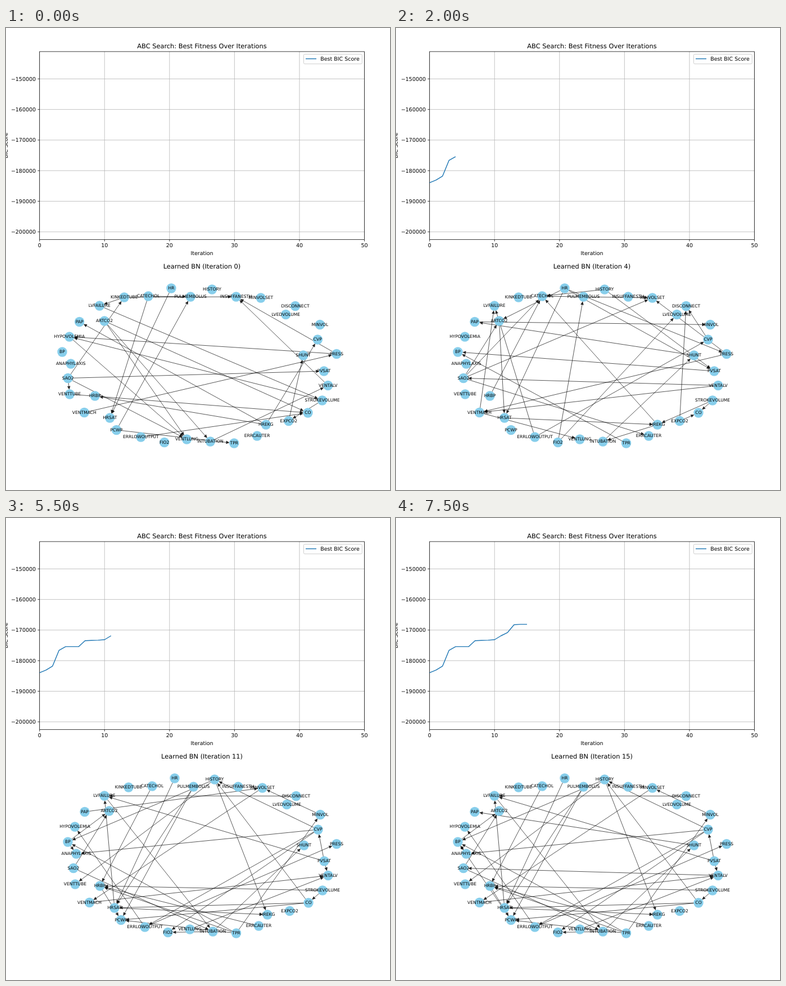
An HTML page that plays this animation: 683x820 px, repeating every 8 s.

```html
<!DOCTYPE html>
<html lang="en">
<head>
<meta charset="utf-8">
<title>Network search</title>
<style>
  html, body { margin: 0; width: 100%; height: 100%; overflow: hidden; background: #fff; }
  svg { display: block; width: 683px; height: 820px; }
  text { font: 9.48px "DejaVu Sans", sans-serif; fill: #000; text-anchor: middle; text-rendering: geometricPrecision; }
  text.title { font-size: 11.38px; }
  text.end { text-anchor: end; }
  text.start { text-anchor: start; }
  #labels text { font-size: 7.59px; }
  #nodes { fill: #87ceeb; }
  .grid { stroke: #b0b0b0; stroke-width: .76; }
  .tick { stroke: #000; stroke-width: .76; }
  .frame { fill: none; stroke: #000; stroke-width: .76; }
  .series { fill: none; stroke: #1f77b4; stroke-width: 1.42; stroke-linejoin: round; }
  #lines { fill: none; stroke: #000; stroke-opacity: .7; stroke-width: .95; }
  #heads { fill: #000; fill-opacity: .85; }
</style>
</head>
<body>
<svg viewBox="0 0 683 820">
  <g id="axes"></g>
  <polyline id="curve" class="series"/>
  <g id="legend"></g>
  <text id="heading" class="title" x="348.5" y="427"></text>
  <g id="lines"></g>
  <g id="heads"></g>
  <g id="nodes"></g>
  <g id="labels"></g>
</svg>
<script>
const STEP = 500, COUNT = 16;
const LEFT = 59.7, RIGHT = 637.5, TOP = 41.9, BOTTOM = 375.5;
const NODE_R = 8.69, GAP = 8.2, HEAD = 6.2, HALF = 2.8;

// Height of the curve at each iteration
const curveY = [274.6, 269.8, 262.8, 234.8, 228.4, 228.4, 228.4, 217.7,
  217.2, 216.9, 216, 209, 203.3, 189.5, 188.6, 188.6];

const places = `HR 300 462;HISTORY 371 464;PULMEMBOLUS 333.5 477;CATECHOL 260 476;KINKEDTUBE 218 478;
INSUFFANESTH 413 477;MINVOLSET 456 479;DISCONNECT 516 493.5;LVEDVOLUME 499.5 508.5;MINVOL 559 526.5;
CVP 555 553;PRESS 588 578.5;SHUNT 530 581;PVSAT 566 609;VENTALV 573 634.5;STROKEVOLUME 563 661;
CO 538 683;EXPCO2 504.5 697.5;HREKG 465 704;ERRCAUTER 449.5 724;TPR 409.5 737;INTUBATION 368 734;
VENTLUNG 327 730;FIO2 288 735.5;ERRLOWOUTPUT 247 726;PCWP 204.5 713.5;HRSAT 193 692;VENTMACH 148.5 682.5;
HRBP 167 653;VENTTUBE 123 650;SAO2 120 621.5;ANAPHYLAXIS 125 596;BP 110 575;HYPOVOLEMIA 122.5 548;
PAP 140 521.5;ARTCO2 183.5 520;LVFAILURE 175 493`;

const nodes = {};
for (const row of places.split(";")) {
  const [name, x, y] = row.trim().split(" ");
  nodes[name] = { x: +x, y: +y };
}

// "SOURCE>TARGET,TARGET SOURCE>TARGET" becomes a set of single links
const links = text => new Set(text.trim().split(/\s+/).flatMap(part => {
  const [from, to] = part.split(">");
  return to.split(",").map(t => from + ">" + t);
}));

const change = (base, add = "", drop = "") => {
  const out = new Set(base);
  if (drop) links(drop).forEach(l => out.delete(l));
  if (add) links(add).forEach(l => out.add(l));
  return out;
};

const first = links(`KINKEDTUBE>LVFAILURE,INSUFFANESTH CATECHOL>PULMEMBOLUS,HRSAT HR>HRSAT
  SAO2>KINKEDTUBE,PVSAT,VENTTUBE,VENTLUNG PCWP>PULMEMBOLUS,TPR LVFAILURE>STROKEVOLUME
  ARTCO2>VENTLUNG,INTUBATION,CO HYPOVOLEMIA>VENTLUNG HREKG>PAP,HRBP,CVP
  PRESS>HYPOVOLEMIA,INSUFFANESTH STROKEVOLUME>HYPOVOLEMIA,EXPCO2 VENTALV>INSUFFANESTH
  VENTTUBE>CO VENTMACH>PRESS ERRLOWOUTPUT>CO INTUBATION>VENTALV EXPCO2>SHUNT`);

const second = links(`HISTORY>CATECHOL,PVSAT HR>ARTCO2,PRESS,HRSAT,PVSAT CATECHOL>MINVOLSET
  PRESS>MINVOLSET,VENTMACH CVP>DISCONNECT EXPCO2>DISCONNECT,CO
  FIO2>PULMEMBOLUS,LVEDVOLUME ERRLOWOUTPUT>CVP,LVFAILURE HREKG>CATECHOL,INTUBATION
  SHUNT>PAP PAP>MINVOL PVSAT>BP TPR>BP VENTALV>SAO2,VENTMACH
  SAO2>CATECHOL,MINVOLSET,ARTCO2,ERRCAUTER HRBP>CATECHOL ARTCO2>HRSAT
  VENTMACH>LVFAILURE,VENTLUNG STROKEVOLUME>HREKG,CO HYPOVOLEMIA>ARTCO2`);

const third = links(`CATECHOL>HRBP HR>HRSAT PULMEMBOLUS>HRSAT,PCWP HISTORY>BP,VENTTUBE,HREKG
  CO>HISTORY,HRSAT,PCWP CVP>HISTORY,ANAPHYLAXIS,ERRLOWOUTPUT,FIO2 MINVOLSET>VENTMACH
  MINVOL>MINVOLSET DISCONNECT>LVFAILURE PVSAT>LVFAILURE,CVP,VENTALV PAP>MINVOLSET
  LVFAILURE>INTUBATION HRSAT>LVFAILURE,HREKG BP>ARTCO2,ANAPHYLAXIS SAO2>ARTCO2,INTUBATION
  ERRLOWOUTPUT>HYPOVOLEMIA,PRESS VENTLUNG>VENTALV VENTMACH>VENTALV
  STROKEVOLUME>HRBP,CO TPR>BP,HRBP,PCWP,MINVOL ERRCAUTER>HRBP INTUBATION>SHUNT,FIO2 HRBP>PCWP`);

const graphs = [first];
graphs[1] = change(first, "INSUFFANESTH>LVEDVOLUME");
graphs[2] = second;
graphs[3] = change(second, "HRSAT>HREKG", "HYPOVOLEMIA>ARTCO2");
graphs[4] = change(graphs[3], "INTUBATION>SHUNT");
graphs[5] = graphs[6] = change(graphs[4], "", "HISTORY>PVSAT");
graphs[7] = change(graphs[6], "MINVOLSET>VENTTUBE");
graphs[8] = change(graphs[7], "", "STROKEVOLUME>HREKG EXPCO2>CO");
graphs[9] = change(graphs[8], "SAO2>VENTLUNG", "PVSAT>BP");
graphs[10] = change(graphs[9], "HISTORY>INSUFFANESTH");
graphs[11] = third;
graphs[12] = change(graphs[6], "KINKEDTUBE>VENTALV SAO2>MINVOL,VENTLUNG");
graphs[13] = change(third, "VENTALV>SAO2");
graphs[14] = graphs[15] = change(graphs[13], "SHUNT>PAP PCWP>BP", "PAP>MINVOLSET");

const $ = id => document.getElementById(id);

function add(parent, tag, attrs, text) {
  const el = document.createElementNS("http://www.w3.org/2000/svg", tag);
  for (const key in attrs) el.setAttribute(key, attrs[key]);
  if (text !== undefined) el.textContent = text;
  return parent.appendChild(el);
}
const line = (parent, x1, y1, x2, y2, cls) => add(parent, "line", { x1, y1, x2, y2, class: cls });
const label = (parent, x, y, text, cls = "") => add(parent, "text", { x, y, class: cls }, text);

function drawAxes() {
  const g = $("axes");
  for (let i = 0; i <= 5; i++) {
    const x = LEFT + i * (RIGHT - LEFT) / 5, y = 90.3 + i * 54.3;
    line(g, x, TOP, x, BOTTOM, "grid");
    line(g, LEFT, y, RIGHT, y, "grid");
    line(g, x, BOTTOM, x, BOTTOM + 3.3, "tick");
    line(g, LEFT - 3.3, y, LEFT, y, "tick");
    label(g, x, 389.2, i * 10);
    label(g, 53, y + 3.5, "\u2212" + (150 + i * 10) + "000", "end");
  }
  add(g, "rect", { x: LEFT, y: TOP, width: RIGHT - LEFT, height: BOTTOM - TOP, class: "frame" });
  label(g, 348.5, 36.3, "ABC Search: Best Fitness Over Iterations", "title");
  label(g, 348.5, 402.5, "Iteration");
  add(g, "text", { transform: "translate(3.3 208.5) rotate(-90)" }, "BIC Score");

  const key = $("legend");
  add(key, "rect", { x: 529.5, y: 46.5, width: 103.8, height: 17.2, rx: 1.9,
    fill: "#fff", "fill-opacity": .8, stroke: "#ccc", "stroke-width": .95 });
  line(key, 533, 54.6, 552, 54.6, "series");
  label(key, 559.3, 58.2, "Best BIC Score", "start");
}

// The first two iterations are spread slightly wider
const place = (name, wide) => {
  const { x, y } = nodes[name];
  return [wide ? 588 - (588 - x) / .9795 : x, y];
};

function drawLink(link, wide) {
  const [[ax, ay], [bx, by]] = link.split(">").map(n => place(n, wide));
  const d = Math.hypot(bx - ax, by - ay), ux = (bx - ax) / d, uy = (by - ay) / d;
  const tx = bx - ux * GAP, ty = by - uy * GAP;
  const hx = tx - ux * HEAD, hy = ty - uy * HEAD;
  line($("lines"), ax + ux * GAP, ay + uy * GAP, hx, hy, "");
  add($("heads"), "polygon", {
    points: [tx, ty, hx - uy * HALF, hy + ux * HALF, hx + uy * HALF, hy - ux * HALF].join(" ")
  });
}

function draw(step) {
  const wide = step < 2;
  $("heading").textContent = `Learned BN (Iteration ${step})`;
  $("curve").setAttribute("points", step
    ? curveY.slice(0, step + 1).map((y, i) => [LEFT + i * (RIGHT - LEFT) / 50, y]).join(" ") : "");
  for (const id of ["lines", "heads", "nodes", "labels"]) $(id).replaceChildren();
  graphs[step].forEach(l => drawLink(l, wide));
  for (const name in nodes) {
    const [x, y] = place(name, wide);
    add($("nodes"), "circle", { cx: x, cy: y, r: NODE_R });
    label($("labels"), x, y + 2.1, name);
  }
}

let shown = 0;
const start = performance.now();
function tick() {
  const step = Math.floor((performance.now() - start) / STEP) % COUNT;
  if (step !== shown) draw(shown = step);
  requestAnimationFrame(tick);
}
drawAxes();
draw(0);
requestAnimationFrame(tick);
</script>
</body>
</html>
```
